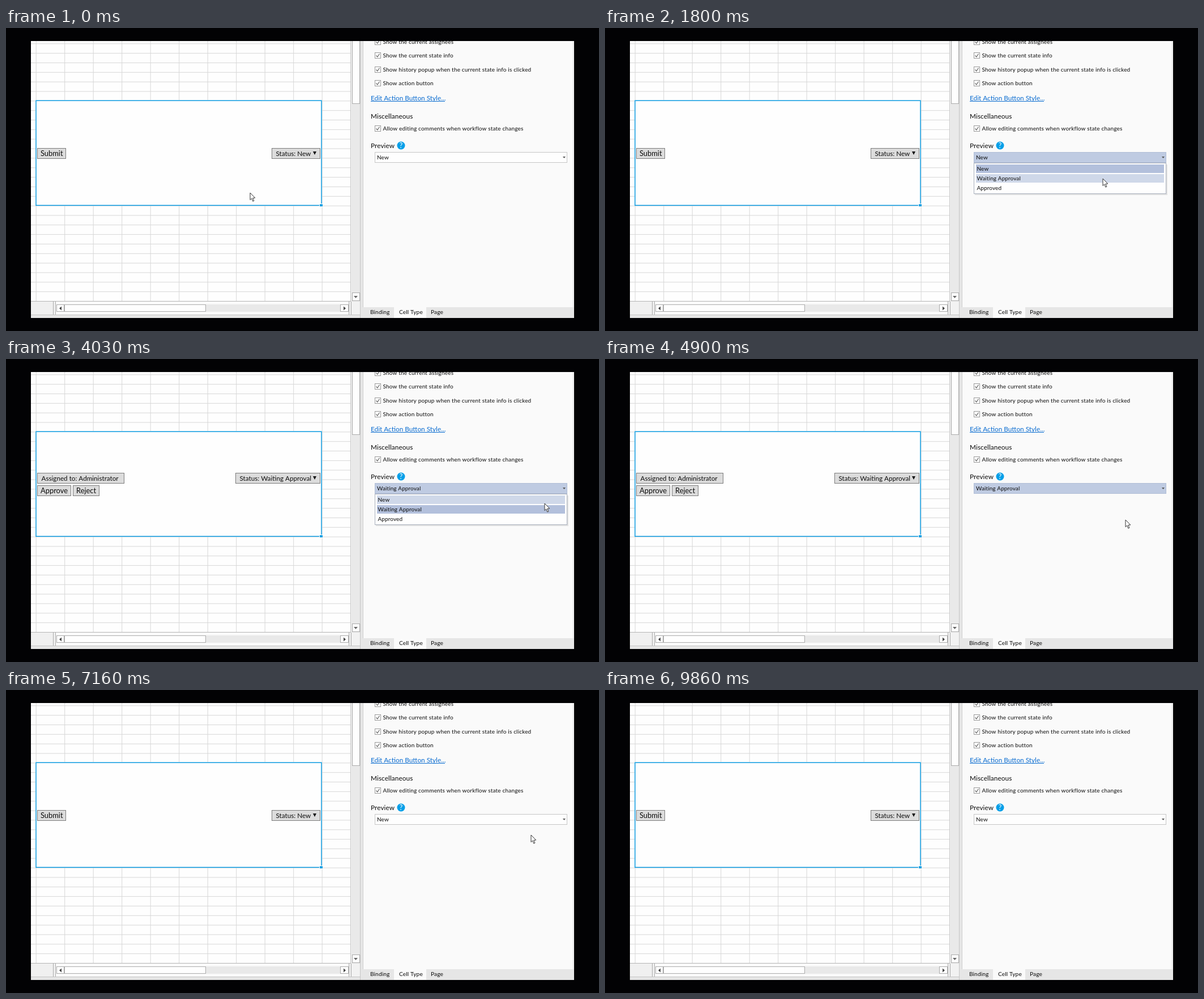
Recreate the animation shown at these times as an HTML page with a canvas. Size 1047 by 535 pixels, loop 9.9 s.

```html
<!DOCTYPE html>
<html lang="en">
<head>
<meta charset="utf-8">
<title>Workflow state preview</title>
<style>
html, body { margin: 0; width: 100%; height: 100%; overflow: hidden; background: #020204; }
canvas { display: block; }
</style>
</head>
<body>
<canvas id="stage" width="1047" height="535"></canvas>
<script>
const ctx = document.getElementById('stage').getContext('2d');
const LOOP = 9900;
const STATES = ['New', 'Waiting Approval', 'Approved'];
const BLUE = '#1ba1e2', INK = '#0c0c0c';

// [start, end, steps, from, to, easing]
const easeOut = p => 1 - (1 - p) ** 2, easeIn = p => p ** 2;
const MOVES = [
  [30, 600, 18, [430, 290], [974, 225], easeOut],
  [760, 760, 1, [974, 225], [975, 225], easeOut],
  [1430, 1800, 12, [975, 225], [878, 265], easeOut],
  [2730, 3260, 16, [878, 265], [978, 229], easeOut],
  [3900, 4360, 15, [978, 229], [918, 283], easeOut],
  [5300, 5730, 13, [918, 283], [943, 232], easeOut],
  [6260, 6500, 8, [943, 232], [926, 255], easeOut],
  [8200, 8560, 12, [926, 255], [905, 22], easeIn]
];
// [open, close, commit]: the chosen state applies just after the list closes
const PICKS = [[1060, 2360, 2400], [3560, 4900, 4930], [6030, 7130, 7160]];

function fill(x, y, w, h, color) {
  ctx.fillStyle = color;
  ctx.fillRect(x, y, w, h);
}

function box(x, y, w, h, color, border) {
  fill(x, y, w, h, border);
  fill(x + 1, y + 1, w - 2, h - 2, color);
}

function text(str, x, y, size = 10, color = INK, spacing = .1) {
  ctx.font = `${size}px Lato, sans-serif`;
  ctx.letterSpacing = spacing + 'px';
  ctx.fillStyle = color;
  ctx.fillText(str, x, y);
}

function shape(color, ...points) {
  ctx.beginPath();
  points.forEach(([x, y]) => ctx.lineTo(x, y));
  ctx.closePath();
  ctx.fillStyle = color;
  ctx.fill();
}

function drawSheet() {
  fill(44, 23, 565, 460, '#fefefe');
  for (let x = 52.7; x < 600; x += 50.5) fill(x, 23, 1, 459, '#d7d7d7');
  for (let y = 27.3; y < 480; y += 16.84) fill(44, y, 565, 1, '#d7d7d7');
  fill(52, 127, 506, 187, '#fefefe');
  ctx.strokeStyle = BLUE;
  ctx.lineWidth = 1.6;
  ctx.strokeRect(53, 128.2, 504, 185);
  fill(553, 310, 6, 6, '#fefefe');
  fill(554, 311, 5, 4, BLUE);
}

function drawScrollbars() {
  fill(608, 23, 18, 489, '#f2f2f2');
  fill(608, 23, 1, 460, '#c6c6c6');
  fill(610, 23, 15, 460, '#e9e9e9');
  box(611, 20, 14, 114, '#fefefe', '#ababab');
  box(611, 467, 14, 15, '#fefefe', '#ababab');
  shape('#666', [614, 473], [621, 473], [617.5, 477]);

  fill(44, 482, 565, 30, '#f0f0f0');
  fill(44, 482, 565, 1, '#b4b4b4');
  fill(83, 483, 1, 23, '#ababab');
  fill(87, 483, 1, 23, '#ababab');
  fill(88, 483, 518, 23, '#fafafa');
  fill(605, 483, 1, 23, '#ababab');
  fill(609, 483, 1, 23, '#ababab');
  fill(89, 488, 516, 13, '#e9e9e9');
  box(89, 488, 14, 13, '#fefefe', '#ababab');
  box(103, 488, 250, 13, '#fefefe', '#ababab');
  box(590, 488, 15, 13, '#fefefe', '#ababab');
  shape('#444', [98, 491.5], [98, 498.5], [94, 495]);
  shape('#444', [596, 491.5], [596, 498.5], [600, 495]);
  fill(44, 506, 587, 6, '#e6e6e6');
  fill(44, 506, 582, 1, '#c6c6c6');
  fill(625, 23, 1, 489, '#c6c6c6');
  fill(626, 23, 5, 489, '#e6e6e6');
  fill(630, 23, 1, 470, '#d0d0d0');
}

function checkbox(label, y, cursor) {
  const hovered = cursor && Math.abs(cursor[1] - y) < 8 && cursor[0] > 651 && cursor[0] < 928;
  box(651, y - 5, 11, 11, '#fefefe', hovered ? '#5b8fd0' : '#9a9a9a');
  ctx.beginPath();
  ctx.moveTo(653.5, y + .5);
  ctx.lineTo(655.8, y + 3);
  ctx.lineTo(659.5, y - 2.5);
  ctx.strokeStyle = '#666';
  ctx.lineWidth = 1.2;
  ctx.stroke();
  text(label, 665.5, y + 3.5, 10, INK, .18);
}

function drawPanel(cursor) {
  fill(631, 23, 372, 489, '#fafafa');
  fill(1000, 23, 3, 470, '#f0f0f0');
  checkbox('Show the current assignees', 24, cursor);
  checkbox('Show the current state info', 48, cursor);
  checkbox('Show history popup when the current state info is clicked', 73, cursor);
  checkbox('Show action button', 97, cursor);
  text('Edit Action Button Style...', 644, 128, 11.8, '#0a6cd0', 0);
  fill(644, 129, 131, 1, '#0a6cd0');
  text('Miscellaneous', 644, 159.5, 11.8);
  checkbox('Allow editing comments when workflow state changes', 177, cursor);
  text('Preview', 644, 212, 11.8);
  ctx.beginPath();
  ctx.arc(697.5, 207.5, 7, 0, 7);
  ctx.fillStyle = '#069fe8';
  ctx.fill();
  ctx.textAlign = 'center';
  text('?', 697.5, 212, 13, '#fff', 0);
  ctx.textAlign = 'left';

  fill(631, 493, 372, 19, '#e6e6e6');
  fill(685, 493, 57, 19, '#fafafa');
  text('Binding', 643, 504.5, 10.2);
  text('Cell Type', 694, 504.5, 10.2);
  text('Page', 750, 504.5, 10.2);
}

function button(label, x, y, right, size, isMenu) {
  box(x, y, right - x, 19, '#dcdcdc', '#7c7c7c');
  text(label, x + (size < 12 ? 7.5 : 6), y + 13.5, size, INK, 0);
  if (isMenu) shape(INK, [542, y + 6], [548, y + 6], [545, y + 12]);
}

function drawCell(state) {
  if (state === 0) {
    button('Submit', 55, 212, 106, 12.9);
    button('Status: New', 469, 212, 555, 11.7, true);
  } else if (state === 1) {
    button('Assigned to: Administrator', 55, 201, 209, 11.7);
    button('Status: Waiting Approval', 405, 201, 555, 11.7, true);
    button('Approve', 55, 223, 115, 12.9);
    button('Reject', 118, 223, 165, 12.9);
  } else {
    button('Status: Approved', 442, 212, 555, 11.7, true);
  }
}

function drawCombo(state, blue, open, cursor) {
  const [cx, cy] = cursor || [0, 0];
  const inside = cx > 651 && cx < 991;
  box(651, 219, 340, 19, blue ? '#bfcbe2' : '#fefefe', blue ? '#b0bdd6' : '#c6c6c6');
  if (!blue && inside && cy >= 219 && cy < 238) box(980, 219, 11, 19, '#d3ddee', '#b4c3de');
  shape('#555', [983, 227], [988, 227], [985.5, 230]);
  text(STATES[state], 655, 232);
  if (!open) return;
  fill(653, 241, 340, 54, '#e2e2e2');
  box(651, 238, 340, 55, '#fefefe', '#a9b0bd');
  STATES.forEach((name, i) => {
    const top = 241 + i * 17;
    const hovered = inside && cy >= top && cy < top + 17;
    if (i === state) fill(655, top, 332, 15, '#b3c0dc');
    else if (hovered) fill(655, top, 332, 15, '#cfd8e9');
    text(name, 656.5, top + 11);
  });
}

function cursorAt(t) {
  if (t >= 8560) return null;
  let pos = MOVES[0][3];
  for (const [start, end, steps, from, to, ease] of MOVES) {
    if (t < start) break;
    const step = start === end ? 1 : Math.floor((t - start) / (end - start) * (steps - 1)) + 1;
    const p = start === end ? 1 : ease(Math.min(1, step / steps));
    pos = from.map((v, i) => Math.round(v + (to[i] - v) * p));
  }
  return pos;
}

function drawCursor([x, y]) {
  ctx.save();
  ctx.translate(x + .5, y + .5);
  ctx.beginPath();
  [[.5, .5], [.5, 13], [3.3, 10.4], [5.3, 15.5], [7.4, 14.6], [5.3, 9.7], [9.3, 9.5]]
    .forEach(([px, py]) => ctx.lineTo(px, py));
  ctx.closePath();
  ctx.fillStyle = '#fff';
  ctx.fill();
  ctx.strokeStyle = '#333';
  ctx.lineWidth = 1;
  ctx.stroke();
  ctx.restore();
}

function draw(t) {
  const cursor = cursorAt(t);
  const state = PICKS.filter(([, , commit]) => t >= commit).length % 3;
  const open = PICKS.some(([from, to]) => t >= from && t < to);
  const blue = PICKS.some(([from, , commit]) => t >= from && t < commit);
  fill(0, 0, 1047, 535, '#020204');
  ctx.save();
  ctx.beginPath();
  ctx.rect(44, 23, 959, 489);
  ctx.clip();
  drawSheet();
  drawScrollbars();
  drawPanel(cursor);
  drawCell(state);
  drawCombo(state, blue, open, cursor);
  if (cursor) drawCursor(cursor);
  ctx.restore();
}

function frame() {
  draw(performance.now() % LOOP);
  requestAnimationFrame(frame);
}
frame();
</script>
</body>
</html>
```
